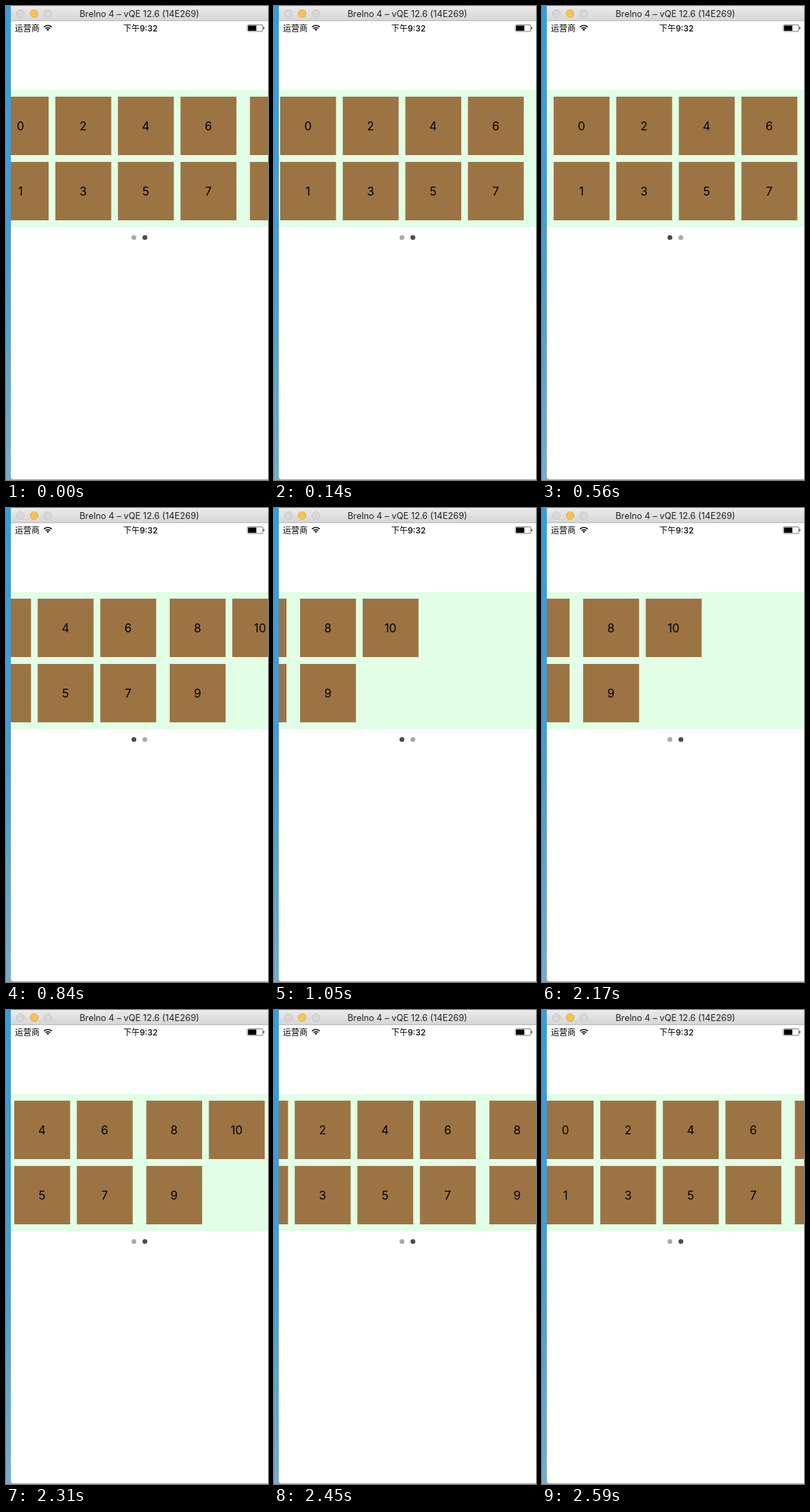
An HTML page that plays this animation: 382x690 px, repeating every 2.66 s.

```html
<!DOCTYPE html>
<html lang="zh">
<head>
<meta charset="utf-8">
<style>
html, body { margin: 0; width: 100%; height: 100%; overflow: hidden; }
svg { display: block; font-family: Inter, "Noto Sans CJK SC", "Noto Sans CJK", sans-serif; }
.tile rect { fill: #9c7443; }
.tile text { font-size: 17px; text-anchor: middle; }
</style>
</head>
<body>
<svg width="382" height="690" viewBox="0 0 382 690">
  <defs>
    <linearGradient id="desk" x2="0" y2="1">
      <stop stop-color="#3a9bd6"/><stop offset=".55" stop-color="#4d9bcd"/><stop offset="1" stop-color="#79abc9"/>
    </linearGradient>
    <linearGradient id="bar" x2="0" y2="1">
      <stop stop-color="#ebebeb"/><stop offset="1" stop-color="#d5d5d5"/>
    </linearGradient>
    <clipPath id="view"><rect x="7" y="122" width="375" height="200"/></clipPath>
  </defs>
  <rect width="382" height="690" fill="url(#desk)"/>
  <path d="M7 0H382V689H11Q7 689 7 685Z" fill="#fff"/>

  <rect x="7" width="375" height="22" fill="url(#bar)"/>
  <rect x="7" y="21" width="375" height="1" fill="#b8b8b8"/>
  <g fill="#d8d8d8" stroke="#c6c6c6">
    <circle cx="21" cy="11" r="5.6"/>
    <circle cx="41" cy="11" r="5.6" fill="#f6c451" stroke="#dfac45"/>
    <circle cx="61" cy="11" r="5.6"/>
  </g>
  <text x="194.5" y="16" font-size="12.8" text-anchor="middle" fill="#222">Brelno 4 – vQE 12.6 (14E269)</text>

  <text x="13" y="36.5" font-size="12">运营商</text>
  <g fill="none" stroke="#000" stroke-width="1.7">
    <path d="M55.4 30.6a7.9 7.9 0 0 1 11.2 0M57.6 32.9a4.8 4.8 0 0 1 6.8 0"/>
    <path d="M61 36.2l-1.9-1.9a2.7 2.7 0 0 1 3.8 0z" fill="#000" stroke="none"/>
  </g>
  <text x="196" y="36.5" font-size="12" font-weight="500" text-anchor="middle">下午9:32</text>
  <rect x="352" y="27.5" width="22.5" height="9.5" rx="1.5" fill="none" stroke="#555" stroke-width=".8"/>
  <rect x="353" y="28.5" width="12" height="7.5" fill="#000"/>
  <rect x="375.2" y="30.7" width="1.3" height="3" rx=".6" fill="#333"/>

  <rect x="7" y="122" width="375" height="200" fill="#e2fee7"/>
  <g clip-path="url(#view)"><g id="strip"></g></g>
  <circle class="dot" cx="186.5" cy="337" r="3.5"/>
  <circle class="dot" cx="202.5" cy="337" r="3.5"/>
</svg>
<script>
const LOOP = 2660, STEP = 70, PAGE = 375;
const strip = document.getElementById('strip');
const dots = document.querySelectorAll('.dot');

// Tiles fill column by column, two rows by four columns per page
let tiles = '';
for (let i = 0; i < 11; i++) {
  const x = 17 + Math.floor(i / 8) * PAGE + Math.floor(i % 8 / 2) * 91.25;
  const y = 132 + i % 2 * 95;
  tiles += `<g class="tile" transform="translate(${x} ${y})">
    <rect width="81.5" height="85"/><text x="40.5" y="48.8">${i}</text></g>`;
}
strip.innerHTML = tiles;

// [ms, scroll offset]: settle, swipe forward, swipe back
const keys = [
  [0, 36.3], [70, 20], [140, 8], [210, 2], [280, 0],
  [560, 0], [630, 10], [700, 38], [770, 86], [840, 153.3], [910, 256], [980, 324],
  [1050, 354], [1120, 367], [1190, 373], [1260, PAGE],
  [2030, PAGE], [2100, 366], [2170, 332], [2310, 187.5], [2450, 78], [2590, 23.3]
];

function scrollAt(t) {
  const next = keys.findIndex(k => k[0] > t);
  if (next < 0) return keys[keys.length - 1][1];
  const [t0, x0] = keys[next - 1], [t1, x1] = keys[next];
  return x0 + (x1 - x0) * (t - t0) / (t1 - t0);
}

function draw(now) {
  const t = Math.floor(now % LOOP / STEP) * STEP;
  strip.setAttribute('transform', `translate(${-scrollAt(t)} 0)`);
  const page = t >= 280 && t < 1260 ? 0 : 1;
  dots.forEach((dot, i) => dot.setAttribute('fill', i === page ? '#4b4b4b' : '#a9a9a9'));
  requestAnimationFrame(draw);
}
draw(performance.now());
</script>
</body>
</html>
```
